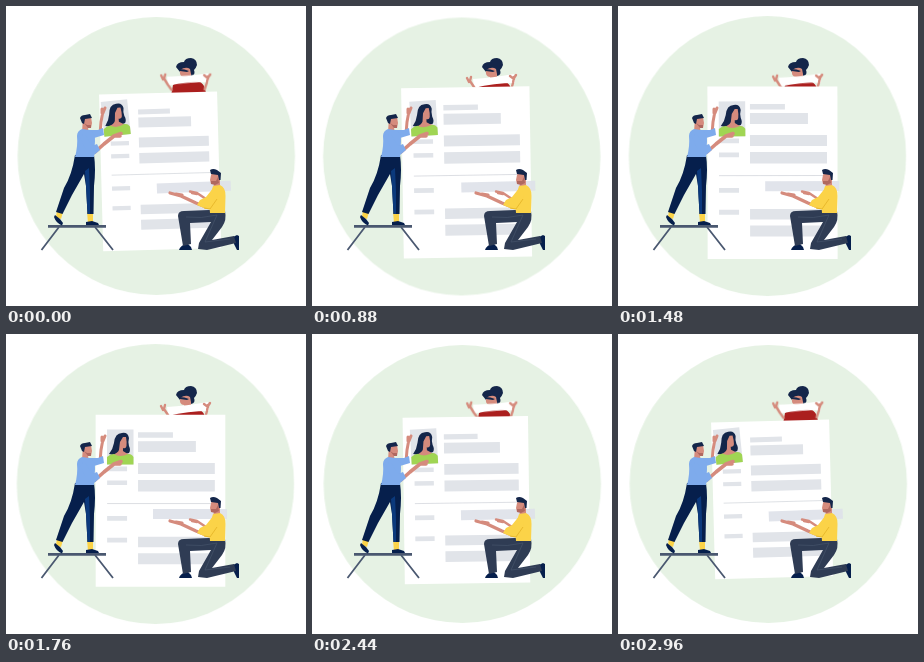
Write an HTML page that moves like this. It is 300 px wide and 300 px high and loops after 3 s.

```html
<!DOCTYPE html>
<html lang="en">
<head>
<meta charset="utf-8">
<title>Building a profile page</title>
<style>
  html, body { margin: 0; width: 100%; height: 100%; overflow: hidden; background: #fff; }
  svg { display: block; width: 100vw; height: 100vh; }

  .bg { fill: #e6f2e4; transform-origin: 150px 150px; animation: breathe 3s infinite; }
  .paper {
    transform-origin: 147px 153px;
    animation: grow 3s infinite, rock 1.5s -2.8s infinite alternate cubic-bezier(.37, 0, .63, 1);
    --tilt: -1.6deg;
  }
  .photo, .held { animation: rock 1.5s -2.8s infinite alternate cubic-bezier(.37, 0, .63, 1); }
  .photo { transform-origin: 102px 155px; --tilt: -6.3deg; }
  .held { transform-origin: 215px 80px; --tilt: -2.3deg; fill: #dee2e9; opacity: .9; }
  .banner { transform-origin: 181px 76px; animation: stretch 3s infinite ease-in-out; }

  @keyframes rock { from { rotate: var(--tilt); } to { rotate: 0deg; } }
  @keyframes grow {
    0% { scale: .908; animation-timing-function: cubic-bezier(.3, .69, .64, 1); }
    49.3% { scale: 1; animation-timing-function: cubic-bezier(.36, 0, .7, .31); }
    98.7%, 100% { scale: .908; }
  }
  @keyframes breathe {
    0%, 100% { transform: translate(.3px, 0); }
    17% { transform: translate(-.5px, .3px); }
    29% { transform: translate(-.2px, .5px); }
    41%, 59% { transform: translate(-.5px, 0) scaleY(1.007); }
    81% { transform: translate(.3px, 0); }
  }
  @keyframes stretch {
    0%, 41%, 81%, 100% { transform: translateY(-1.5px) rotate(2.5deg); }
    17%, 29%, 59% { transform: none; }
  }

  .bars { fill: #e1e4e9; }
  .skin { fill: #d58b7d; }
  .shade { fill: #b0685f; }
  .arm { fill: none; stroke: #d58b7d; stroke-linecap: round; stroke-linejoin: round; }
  .ink { fill: #14264a; }
  .blue { fill: #7eabec; }
  .yellow { fill: #fbd348; }
  .navy { fill: #061f4c; }
  .slate { fill: #2f3c54; }
  .red { fill: #ab1f1e; }
</style>
</head>
<body>
<svg viewBox="0 0 300 300">
  <ellipse class="bg" cx="150" cy="150" rx="138.7" ry="139"/>

  <!-- woman behind the page -->
  <g>
    <path class="red" d="M165 90 167 79Q171 75 176 75L190 74Q196 76 198 80L201 90Z"/>
    <path class="ink" d="M170 61Q171 56 178 56 179 52 185 52 191 53 191 59 190 62 188 64 190 69 185 70L174 66Z"/>
    <path class="skin" d="M174 64Q180 60 184 63L185 68 185 74 179 75 178 71Q173 71 174 64Z"/>
    <path class="ink" d="M173 63Q179 63 183 65L181 66 174 65Z"/>
    <g class="banner">
      <path d="M161 73Q180 72 202 68L203 77Q182 77 162 82Z" fill="#fff"/>
      <g class="arm" stroke-width="2.4">
        <path d="M166 86 162 81 158 75M157 76 155 72M158 75 159 71"/>
        <path d="M199 84 201 77 202 71M202 73 198 70M202 72 204 69"/>
      </g>
    </g>
  </g>

  <!-- page -->
  <g class="paper">
    <path d="M89.5 80.5H219.5V253H89.5Z" fill="#fff"/>
    <g class="bars">
      <rect x="132" y="98" width="35" height="5.5"/>
      <rect x="132" y="107" width="58" height="11"/>
      <rect x="132" y="129" width="77" height="11"/>
      <rect x="132" y="146" width="77" height="11.5"/>
      <rect x="132" y="203" width="77" height="10.5"/>
      <rect x="132" y="219.5" width="77" height="11"/>
      <rect x="101" y="132.5" width="20" height="4.6"/>
      <rect x="101" y="146.5" width="20" height="4.6"/>
      <rect x="101" y="182" width="20" height="4.8"/>
      <rect x="101" y="203.8" width="20" height="4.8"/>
    </g>
    <path d="M101 169.6H213" stroke="#d3d6dc" stroke-width=".8"/>
  </g>

  <!-- portrait card -->
  <g class="photo">
    <rect x="101" y="95.5" width="26.500" height="35" fill="#e1e4e9"/>
    <path class="ink" d="M103 120Q107 115 108 109 109 99 116 99 122 98 123 104 122 107 123 112 125 116 123 119L112 122Z"/>
    <path class="skin" d="M106 121Q112 119 113 116L114 108 117 103 120 103Q121 108 120.500 112 120 115 117 114L117 117Q121 120 125 121L120 125 108 125Z"/>
    <path d="M101 130.5V123Q104 120 108 120 114 124 122 120 126 120 127.5 123V130.5Z" fill="#a0d553"/>
  </g>

  <rect class="held" x="147" y="175" width="74" height="10"/>

  <!-- table -->
  <g fill="none" stroke="#4a5870">
    <path d="M42 220.3H100" stroke-width="2.8"/>
    <path d="M53 221 35.500 244M89 221 107 244" stroke-width="1.8"/>
  </g>

  <!-- standing man -->
  <g>
    <path class="arm" d="M94 128 95 116 97 105M97 107 99 102M96 107 96 103" stroke-width="3"/>
    <path class="blue" d="M82 124 92 124 97 122 98 129 88 132Z"/>
    <path class="yellow" d="M51 204 57 206 55 213 50 211ZM81 206 87 206 87 217 82 217Z"/>
    <path class="navy" d="M49 209 54 213 57 217 56 219.500Q50 217 48 211ZM80 216 86 215 92 217 93 219 80 219Z"/>
    <path class="navy" d="M69 149 88 149Q90 163 88 180L87.500 208 81.500 208 80 180 78 168 66 189 56.500 208 50 206 58 182Q66 169 69 149Z"/>
    <path d="M79 165 83 162 84 185 84 208 81.500 208 80 180Z" fill="#0b397c"/>
    <path class="skin" d="M77 112 85 111 86 117 85 122 82 122 83 127 76 126Z"/>
    <path class="shade" d="M78 117 81 119 85 119 85 122 82 122Z"/>
    <path class="ink" d="M74 112Q75 109 79 109L84 108 86 112 79 113 78 118 76 117Z"/>
    <path class="blue" d="M76 123 83 124Q90 127 89 135L88 151 69 151Q72 140 71 130 71 125 76 123Z"/>
    <path class="arm" d="M89 146 98 138 108 130 115 127.500M108 130 114 130" stroke-width="3.6"/>
    <path class="blue" d="M73 128 80 130 86 140 91 138 94 144 88 149Q84 150 80 145Z"/>
  </g>

  <!-- kneeling man -->
  <g>
    <path class="arm" d="M200 193 191 187 184 185.500M191 188 186 187" stroke-width="2.4"/>
    <path class="navy" d="M227 231 231 229 233 230 233 244 231 244 228 238ZM173 244Q174 240 181 237L185 241 186 244Z"/>
    <path class="slate" d="M203 204 219 205Q221 214 216 221L206 234 228 230 230 237 201 244 192 243 193 237 205 216 184 217 185 238 177 240 172 210Q172 205 178 205Z"/>
    <path d="M180 211Q195 213 211 209L199 236 224 233" fill="none" stroke="#46536b" stroke-width=".7"/>
    <path class="skin" d="M206 167 214 167 214 182 207 182 208 178 205 178 204 174 205 169Z"/>
    <path class="shade" d="M205 175 210 175 212 171 213 177 209 179 205 178Z"/>
    <path class="ink" d="M204 164Q207 162 211 164L215 167 214.500 174 213 174 212 169 205 168Z"/>
    <path class="yellow" d="M207 180 214 179Q220 182 219.500 190L219 207 204 207 203 194Z"/>
    <path class="arm" d="M200 201 190 197 175 190 164 187M176 189 170 188" stroke-width="3.2"/>
    <path class="yellow" d="M208 181Q213 185 211 192L204 203Q201 204 191 199L194 194 200 191Z"/>
    <path d="M198 202 204 203 211 193" fill="none" stroke="#e9b92c"/>
  </g>
</svg>
</body>
</html>
```
